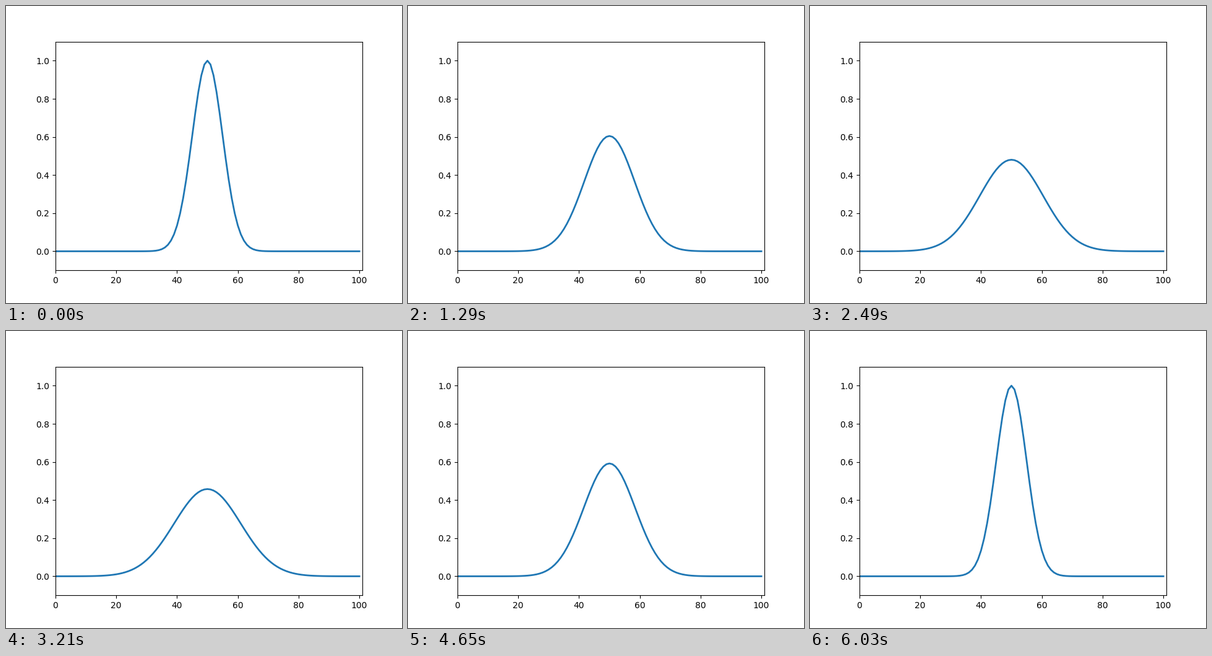
A matplotlib script for the animation above (6060 ms loop, 640x480 px).

```python
import numpy as np
import matplotlib.pyplot as plt
from matplotlib.animation import FuncAnimation

STEPS = 100
CENTER, SIGMA = 50, 5
R = 0.5  # diffusion number D * dt / dx**2


def diffuse(u):
    """One explicit step of the heat equation with fixed ends."""
    new = u.copy()
    new[1:-1] += R * (u[2:] - 2 * u[1:-1] + u[:-2])
    return new


x = np.arange(101)
states = [np.exp(-((x - CENTER) ** 2) / (2 * SIGMA**2))]
for _ in range(STEPS):
    states.append(diffuse(states[-1]))

# Spread out, then run back to the start
states += states[::-1]

fig, ax = plt.subplots(figsize=(6.4, 4.8), dpi=100)
ax.set_xlim(0, 101)
ax.set_ylim(-0.1, 1.1)
line, = ax.plot(x, states[0], lw=2)


def update(i):
    line.set_ydata(states[i])
    return line,


anim = FuncAnimation(fig, update, frames=len(states), interval=30,
                     repeat=True, repeat_delay=0)
plt.show()
```
